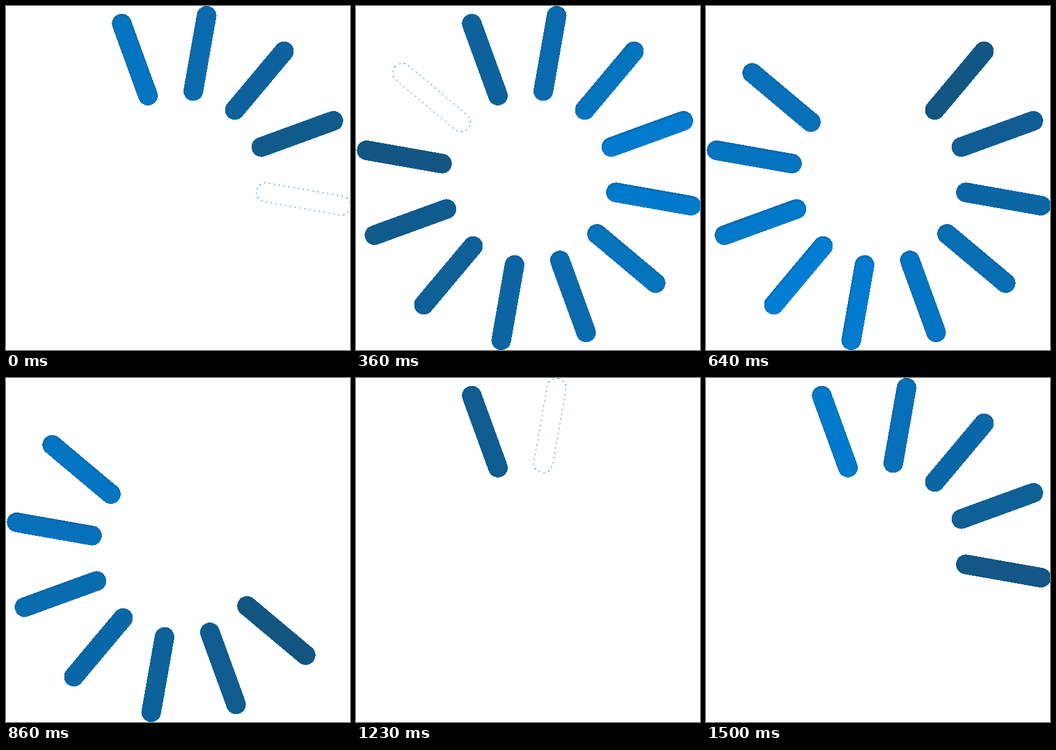
Recreate the animation shown at these times as an HTML page. Size 560 by 560 pixels, loop 1550 ms.

```html
<!DOCTYPE html>
<html lang="en">
<head>
<meta charset="utf-8">
<title>Spinner</title>
<style>
  html, body { margin: 0; width: 100%; height: 100%; overflow: hidden; background: #fff; }
  svg { display: block; width: 100vw; height: 100vh; }
  line { stroke-linecap: round; }
  .hint { fill: none; stroke: #0a64a6; stroke-width: 1; stroke-dasharray: 2 6; }
</style>
</head>
<body>
<svg id="stage" viewBox="0 0 560 560" shape-rendering="crispEdges"></svg>
<script>
const LOOP = 1550, STEPS = 34, FPS = 22;
const CYCLE = 32, LIFE = 18;              // in steps
const CENTER = [281.5, 280], INNER = 143.4, OUTER = 267.9, RADIUS = 16;
const SIDE = -1.5;                        // bars sit a little beside their spoke
const DARK = [20, 82, 124], BRIGHT = [0, 127, 214];
// Step at which each bar rises, clockwise from the top left one
const RISE = [-6.9, -5, -3.3, -1.7, 0, 1.5, 3, 4.2, 5.3, 6.3, 7.2, 8];

const stage = document.getElementById('stage');

function add(parent, tag, attrs) {
  const el = document.createElementNS('http://www.w3.org/2000/svg', tag);
  for (const name in attrs) el.setAttribute(name, attrs[name]);
  return parent.appendChild(el);
}

const mix = p => `rgb(${DARK.map((d, i) => Math.round(d + (BRIGHT[i] - d) * p))})`;
const startOf = step => step < STEPS ? Math.round(step / FPS * 100) * 10 : LOOP;

// Hard steps: each pose holds until the next one starts
function play(el, pose) {
  const frames = [];
  for (let step = 0; step <= STEPS; step++) {
    frames.push({
      ...pose(Math.min(step, STEPS - 1)),
      offset: startOf(step) / LOOP,
      easing: 'steps(1, end)'
    });
  }
  el.animate(frames, { duration: LOOP, iterations: Infinity });
}

RISE.forEach((rise, i) => {
  const age = step => ((step - rise) % CYCLE + CYCLE) % CYCLE;
  const level = step => Math.max(0, 1 - Math.abs(age(step) * 2 / LIFE - 1));
  const emerging = step => age(step) < .05;
  const shown = step => !emerging(step) && age(step) < LIFE;
  const turn = `rotate(${i * 30 - 20}) translate(${SIDE} 0)`;
  const bar = add(stage, 'g', {});

  // Nested layers shade the upper left rim of raised bars
  for (let inset = 0; inset < 3; inset++) {
    const x = CENTER[0] + inset * .35, y = CENTER[1] + inset * .93;
    const layer = add(bar, 'line', {
      y1: -INNER, y2: -OUTER,
      'stroke-width': 2 * (RADIUS - inset),
      transform: `translate(${x} ${y}) ${turn}`
    });
    play(layer, step => {
      const p = level(step);
      const shade = Math.max(0, p - .4) * .35 * (2 - inset);
      return { stroke: mix(p - shade) };
    });
  }
  play(bar, step => ({ opacity: shown(step) ? 1 : 0 }));

  const hint = add(stage, 'rect', {
    class: 'hint',
    x: -RADIUS + .5, y: -OUTER - RADIUS + .5,
    width: 2 * RADIUS - 1, height: OUTER - INNER + 2 * RADIUS - 1,
    rx: RADIUS - .5,
    transform: `translate(${CENTER}) ${turn}`
  });
  play(hint, step => ({ opacity: emerging(step) ? 1 : 0 }));
});
</script>
</body>
</html>
```
